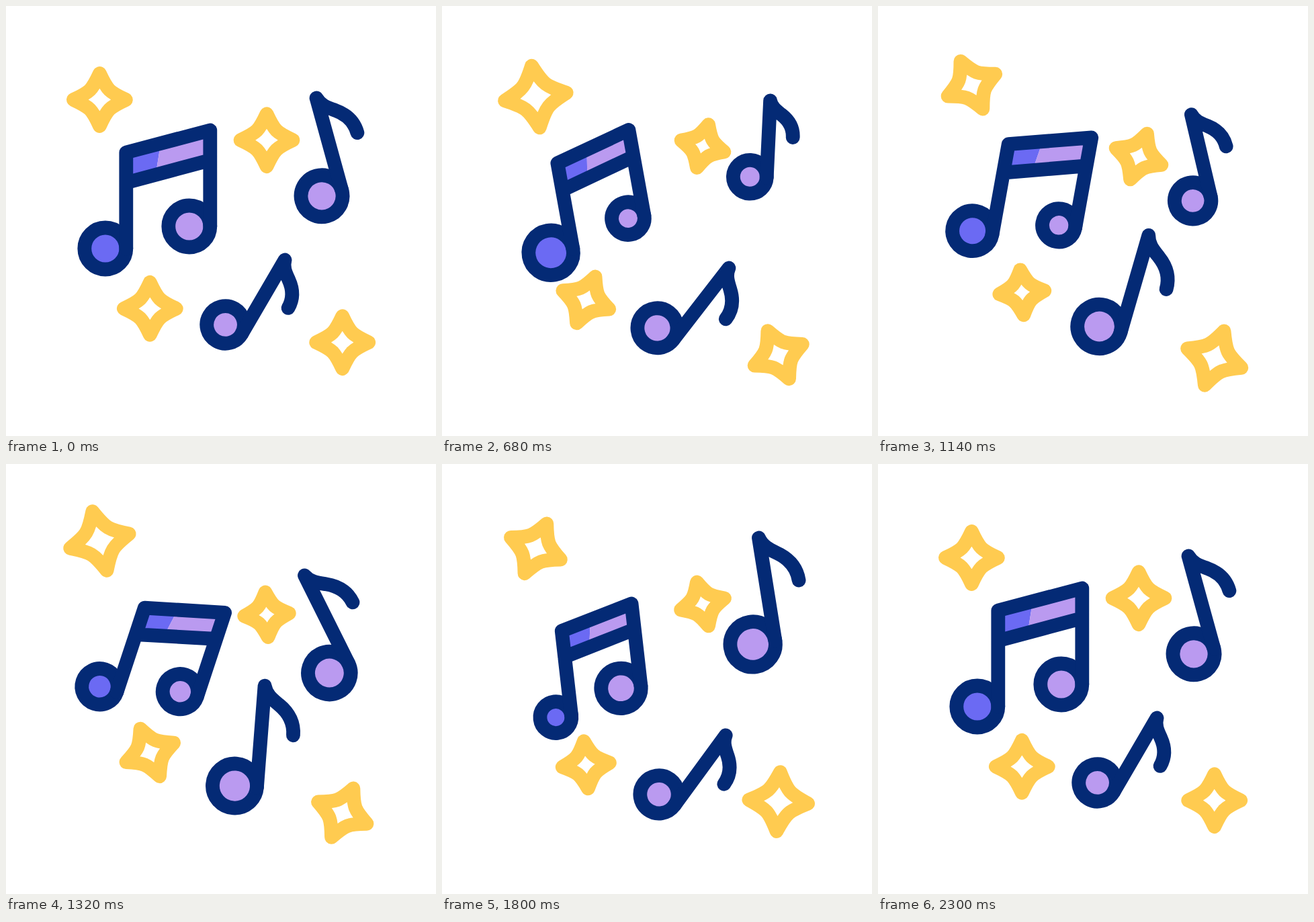
Recreate the animation shown at these times as an HTML page. Size 640 px wide and 640 px high, loop 2400 ms.

```html
<!DOCTYPE html>
<html lang="en">
<head>
<meta charset="utf-8">
<title>Music notes</title>
<style>
  html, body { margin: 0; width: 100%; height: 100%; overflow: hidden; background: #fff; }
  svg { display: block; width: 100%; height: 100%; }
  .line { fill: none; stroke-linecap: round; stroke-linejoin: round; }
</style>
</head>
<body>
<svg id="stage" viewBox="0 0 640 640" xmlns="http://www.w3.org/2000/svg"></svg>
<script>
const LOOP = 2400, STROKE = 20.8;
const NAVY = '#042a75', YELLOW = '#ffcb50', LILAC = '#ba9af0', BLUE = '#6b6af3';
const stage = document.getElementById('stage');

function add(parent, tag, attrs) {
  const el = document.createElementNS(stage.namespaceURI, tag);
  set(el, attrs);
  parent.appendChild(el);
  return el;
}

function set(el, attrs) {
  for (const k in attrs) el.setAttribute(k, attrs[k]);
}

const clamp = v => Math.max(0, Math.min(1, v));
const ease = f => (1 - Math.cos(Math.PI * clamp(f))) / 2;

// Eased value at time t, resting at each key.
function tween(t, times, values) {
  let i = 0;
  while (i < times.length - 2 && t > times[i + 1]) i++;
  const f = clamp((t - times[i]) / (times[i + 1] - times[i]));
  return { v: values[i] + (values[i + 1] - values[i]) * ease(f), f };
}

// Smooth curve through rows [time, ...values], at rest at both ends.
function spline(t, rows) {
  const n = rows.length;
  let i = 0;
  while (i < n - 2 && t > rows[i + 1][0]) i++;
  const a = rows[i], b = rows[i + 1], h = b[0] - a[0];
  const f = clamp((t - a[0]) / h), f2 = f * f, f3 = f2 * f;
  const slope = (k, c) => {
    if (k === 0 || k === n - 1) return 0;
    const [p, q, r] = [rows[k - 1], rows[k], rows[k + 1]];
    const d0 = q[0] - p[0], d1 = r[0] - q[0];
    return ((q[c] - p[c]) / d0 * d1 + (r[c] - q[c]) / d1 * d0) / (d0 + d1);
  };
  return a.slice(1).map((v, j) => {
    const c = j + 1;
    return v * (2 * f3 - 3 * f2 + 1) + b[c] * (3 * f2 - 2 * f3)
      + h * (slope(i, c) * (f3 - 2 * f2 + f) + slope(i + 1, c) * (f3 - f2));
  });
}

function place(g, x, y, turn, scale, px, py) {
  set(g, {
    transform: `translate(${x} ${y}) rotate(${turn}) scale(${scale}) translate(${-px} ${-py})`,
    'stroke-width': STROKE / scale
  });
}

// Sparkles: bob once, sway both ways and pulse three times.
const STAR_R = 39;
function star(o) {
  const quarter = 'C11.7 -14 14 -11.7 39 0C14 11.7 11.7 14 0 39C-11.7 14 -14 11.7 -39 0C-14 -11.7 -11.7 -14 0 -39Z';
  const g = add(stage, 'g', { stroke: YELLOW, class: 'line' });
  add(g, 'path', { d: 'M0 -39' + quarter });
  const first = o.times[0], last = o.times[3];
  return t => {
    const lift = tween(t, [o.from || first, o.peak, last], [0, o.dy, 0]).v;
    const sway = tween(t, o.times, [0, o.sway[0], o.sway[1], 0]);
    const r = STAR_R + o.pulse * Math.sin(Math.PI * sway.f) ** 2;
    place(g, o.x, o.y + lift, sway.v, r / STAR_R, 0, 0);
  };
}

// Rows: time, x, y, turn, scale
function singleNote(rows) {
  const g = add(stage, 'g', { stroke: NAVY, class: 'line' });
  add(g, 'circle', { cx: -31, cy: 142.7, r: 31, fill: LILAC });
  add(g, 'path', { d: 'M0 142.7V0C3 12 12 18 22 25S45 44 45 66' });
  return t => {
    const [x, y, turn, scale] = spline(t, rows);
    place(g, x, y, turn, scale, 8, 85);
  };
}

// Rows: time, y, turn, scale, left radius, right radius, left stem
function beamedNote(x, rows) {
  const g = add(stage, 'g', { stroke: NAVY, class: 'line' });
  add(g, 'path', { d: 'M0 0L51.5 -14L44 33L0 45Z', fill: BLUE, stroke: 'none' });
  add(g, 'path', { d: 'M51.5 -14L125 -33V11.5L44 33Z', fill: LILAC, stroke: 'none' });
  const left = add(g, 'circle', { fill: BLUE });
  const right = add(g, 'circle', { fill: LILAC });
  const frame = add(g, 'path', {});
  return t => {
    const [y, turn, scale, rl, rr, stem] = spline(t, rows);
    const a = rl / scale, b = rr / scale;
    set(left, { cx: -a, cy: stem, r: a });
    set(right, { cx: 125 - b, cy: 110, r: b });
    set(frame, { d: `M0 ${stem}V0L125 -33V110M0 45L125 11.5` });
    place(g, x, y, turn, scale, 47, 75);
  };
}

const parts = [
  star({ x: 139.4, y: 139.5, dy: -25, peak: 1360, times: [420, 1135, 1724, 2300], sway: [-25, 25], pulse: 8.7 }),
  star({ x: 388, y: 199.7, dy: 25, peak: 1240, times: [300, 1010, 1550, 2180], sway: [27, -22.5], pulse: -6 }),
  star({ x: 214.3, y: 450.3, dy: -24, from: 200, peak: 1120, times: [120, 820, 1395, 1980], sway: [24, -24], pulse: -5.6 }),
  star({ x: 500.7, y: 500.7, dy: 25, peak: 980, times: [100, 680, 1260, 1980], sway: [-24, 24.5], pulse: 10 }),
  beamedNote(225.8, [
    [120, 293, 0, 1, 31, 31, 143],
    [400, 306.7, -8.3, 0.87, 32.4, 27, 143],
    [940, 279.5, -4.8, 0.967, 32.5, 23.6, 143],
    [1320, 293.5, 18.3, 0.925, 26.7, 26.1, 143],
    [1640, 315.4, -6.9, 0.79, 19.5, 28.7, 150],
    [1980, 296, -1.9, 0.968, 29.2, 30.5, 143],
    [2260, 293, 0, 1, 31, 31, 143]
  ]),
  singleNote([
    [120, 492.3, 216.8, -15.4, 1],
    [400, 492.7, 210.2, -8.6, 0.956],
    [940, 490.8, 215.8, 4.7, 0.735],
    [1320, 490.7, 240.3, -26.5, 1.025],
    [1640, 494.7, 203.4, -12.6, 1.13],
    [1980, 493.7, 203.6, -8.4, 1.02],
    [2260, 492.3, 216.8, -15.4, 1]
  ]),
  singleNote([
    [120, 382.8, 447.4, 30.3, 0.896],
    [400, 382.7, 457, 32.8, 0.898],
    [940, 384.5, 451, 35.2, 1.012],
    [1320, 386.6, 420.9, 4.4, 1.065],
    [1640, 383.6, 471, 29.6, 0.938],
    [1980, 381.9, 460, 38.4, 0.894],
    [2260, 382.8, 447.4, 30.3, 0.896]
  ])
];

function draw(t) {
  for (const update of parts) update(t);
}

const start = performance.now();
function tick() {
  draw((performance.now() - start) % LOOP);
  requestAnimationFrame(tick);
}
draw(0);
requestAnimationFrame(tick);
</script>
</body>
</html>
```
